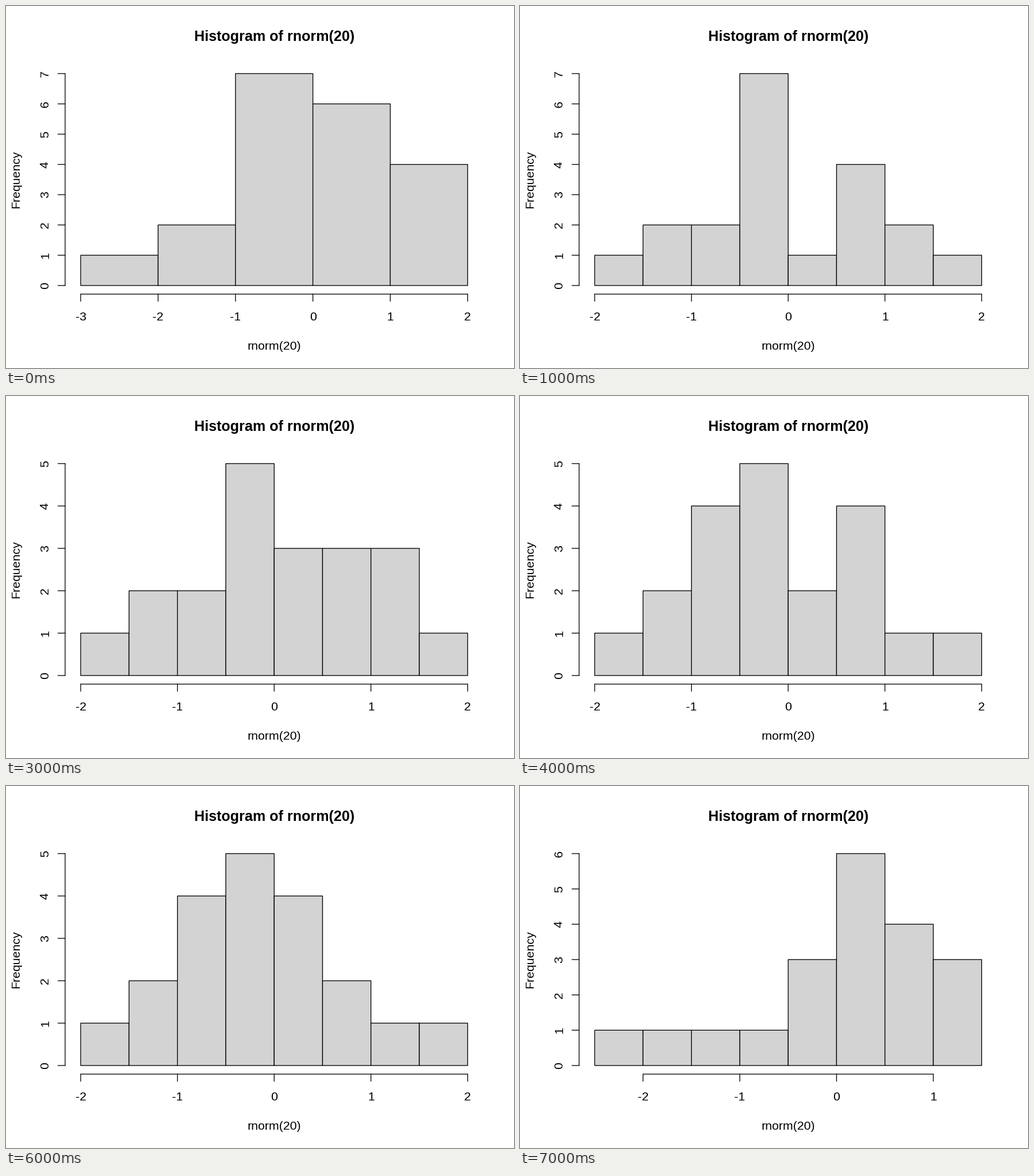
Recreate the animation shown at these times as a matplotlib script. Size 885 px wide and 632 px high, loop 8000 ms.

```python
import math

import matplotlib.pyplot as plt
from matplotlib.animation import FuncAnimation
from matplotlib.patches import Rectangle

W, H, DPI = 885, 632, 100
LEFT, SPAN = 130.1, 674.2    # horizontal extent of the bars
BASE, RISE = 488, 370        # zero line and height of the tallest bar
AXIS_X, AXIS_Y = 103, 503
TICK = 12.5
LINE = 1.33
DRAWS = 20

plt.rcParams["font.family"] = "Liberation Sans"
plt.rcParams["path.snap"] = False
plt.rcParams["text.kerning_factor"] = 6


def sample(*counts, high=2):
    """Breaks and counts; the last bin holds the draws that are left."""
    counts = [*counts, DRAWS - sum(counts)]
    step = 1 if len(counts) < 6 else 0.5
    breaks = [high - step * k for k in range(len(counts), -1, -1)]
    return breaks, counts


def bell(mean, sd, bins=8, step=0.5):
    """Expected counts of a normal sample, without the last bin."""
    peak = DRAWS * step / (sd * math.sqrt(2 * math.pi))
    mids = [2 - step * (bins - k - 0.5) for k in range(bins - 1)]
    return [round(peak * math.exp(-((m - mean) / sd) ** 2 / 2)) for m in mids]


SAMPLES = [
    sample(1, 2, 7, 6),
    sample(1, 2, 2, 7, 1, 4, 2),
    sample(1, 5, 5, 7),
    sample(1, 2, 2, 5, 3, 3, 3),
    sample(1, 2, 4, 5, 2, 4, 1),
    sample(*[1] * 3, 2, 1, *[4] * 3),
    sample(*bell(-0.25, 0.8)),
    sample(*[1] * 4, 3, 6, 4, high=1.5),
]


def px(size):
    """Size in points for a size in pixels."""
    return size * 72 / DPI


fig = plt.figure(figsize=(W / DPI, H / DPI), dpi=DPI, facecolor="white")
ax = fig.add_axes([0, 0, 1, 1])


def line(xs, ys):
    ax.plot(xs, ys, color="black", lw=px(LINE), solid_capstyle="round")


def label(x, y, text, size=21.3, **style):
    ax.text(x, y, text, fontsize=px(size), color="black", ha="center",
            va="baseline", rotation_mode="anchor", **style)


def draw(i):
    breaks, counts = SAMPLES[i]
    low, high, top = breaks[0], breaks[-1], max(counts)

    def to_x(v):
        return LEFT + SPAN * (v - low) / (high - low)

    def to_y(v):
        return BASE - RISE * v / top

    ax.clear()
    ax.set_xlim(0, W)
    ax.set_ylim(H, 0)
    ax.axis("off")

    label(468, 61, "Histogram of rnorm(20)", 25.1, weight="bold")
    label(467.5, 599.5, "rnorm(20)")
    label(23, 303, "Frequency", rotation=90)

    for a, b, count in zip(breaks, breaks[1:], counts):
        y = to_y(count)
        ax.add_patch(Rectangle((to_x(a), y), to_x(b) - to_x(a), BASE - y,
                               facecolor="#d3d3d3", edgecolor="black",
                               lw=px(LINE), joinstyle="round", zorder=2))

    marks = range(math.ceil(low), math.floor(high) + 1)
    line([to_x(marks[0]), to_x(marks[-1])], [AXIS_Y, AXIS_Y])
    for v in marks:
        line([to_x(v)] * 2, [AXIS_Y, AXIS_Y + TICK])
        label(to_x(v), 549, str(v))

    line([AXIS_X, AXIS_X], [BASE, BASE - RISE])
    for v in range(top + 1):
        line([AXIS_X - TICK, AXIS_X], [to_y(v)] * 2)
        label(74, to_y(v), str(v), rotation=90)


anim = FuncAnimation(fig, draw, frames=len(SAMPLES), init_func=lambda: None,
                     interval=1000, repeat=True, repeat_delay=0)
plt.show()
```
